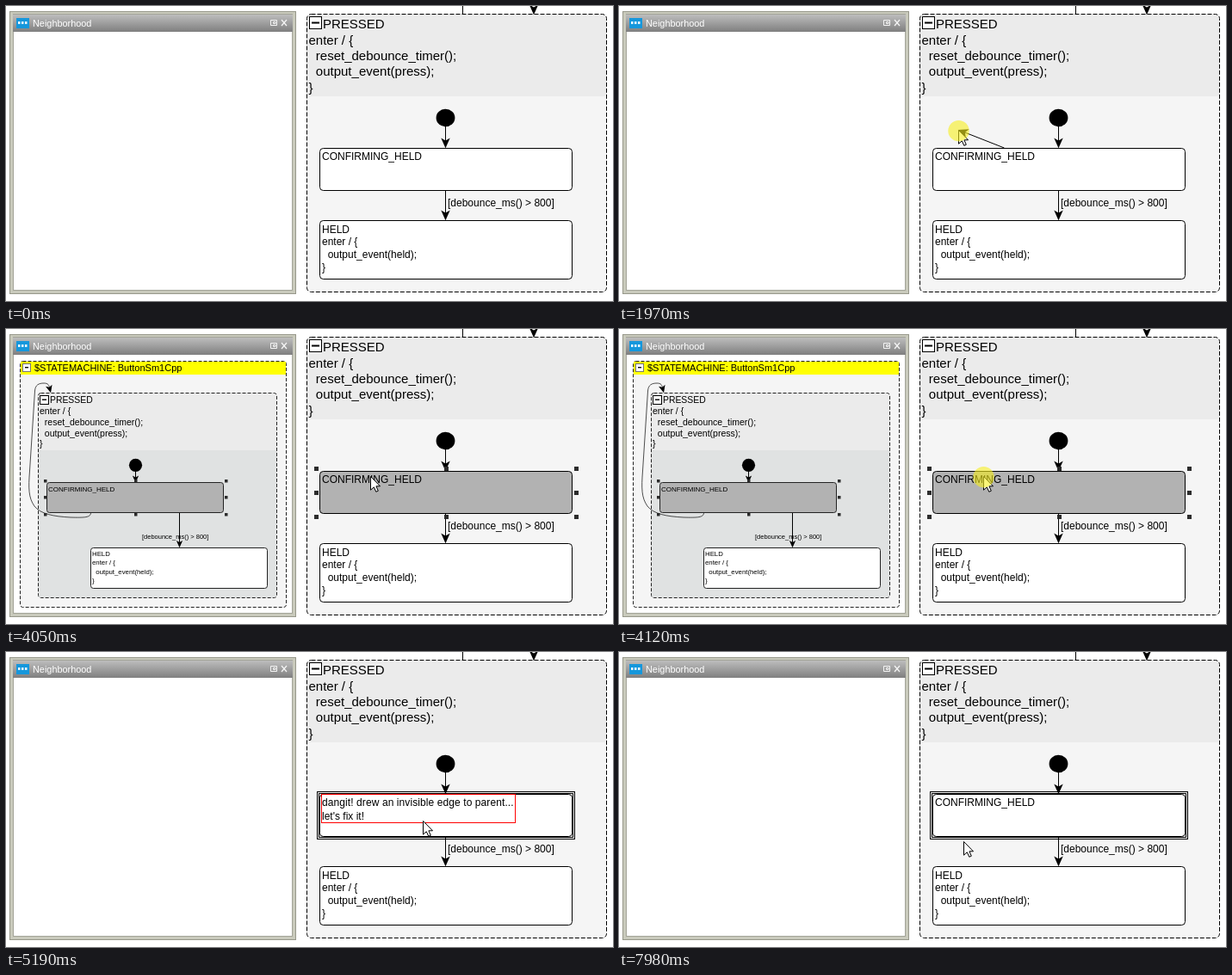
An HTML page for the animation above (8000 ms loop, 705 by 343 pixels).

```html
<!DOCTYPE html>
<html lang="en">
<head>
<meta charset="utf-8">
<title>State machine editor</title>
<style>
  html, body { margin: 0; width: 100%; height: 100%; overflow: hidden; background: #fff; }
  svg { display: block; width: 705px; height: 343px; }
  text { font-family: "Liberation Sans", Arial, sans-serif; white-space: pre; }
</style>
</head>
<body>
<svg id="stage" viewBox="0 0 705 343" xmlns="http://www.w3.org/2000/svg"></svg>
<script>
const LOOP = 8000;

// Shape helpers
const rect = (x, y, w, h, fill, more = '') =>
  `<rect x="${x}" y="${y}" width="${w}" height="${h}" fill="${fill}" ${more}/>`;
const box = (x, y, w, h, fill, rx = 0, color = '#000', more = '') =>
  rect(x + .5, y + .5, w - 1, h - 1, fill, `rx="${rx}" stroke="${color}" ${more}`);
const text = (x, y, size, str, fill = '#000', more = '') =>
  `<text x="${x}" y="${y}" font-size="${size}" fill="${fill}" ${more}>${str.replace(/>/g, '&gt;')}</text>`;
const lines = (x, ys, size, strs) => strs.map((s, i) => text(x, ys[i], size, s)).join('');
const path = (d, more = 'fill="none" stroke="#000"') => `<path d="${d}" ${more}/>`;
const head = (x, y, deg = 90, s = 1) =>
  `<path d="M.3 0L-11.5 -5.2L-8.5 0L-11.5 5.2z" transform="translate(${x} ${y}) rotate(${deg}) scale(${s})"/>`;
const toggle = (x, y, s, color) =>
  box(x, y, s, s, '#fff', 0, color) + rect(x + 3, y + (s - 1) / 2 - .5, s - 6, s > 12 ? 2 : 1.4, '#000');
const handles = (xs, ys, s) => xs.flatMap((x, i) => ys.map((y, j) =>
  i === 1 && j === 1 ? '' : rect(x, y, s, s, '#2c2c2c'))).join('');
const layer = (id, content) => `<g id="${id}" visibility="hidden">${content}</g>`;

const dash = 'stroke-dasharray="5 2"';
const heldCode = ['HELD', 'enter / {', '  output_event(held);', '}'];
const pressedCode = ['enter / {', '  reset_debounce_timer();', '  output_event(press);', '}'];
const guard = '[debounce_ms() > 800]';

const panel =
  '<linearGradient id="bar" x2="0" y2="1"><stop stop-color="#bdbdbd"/><stop offset="1" stop-color="#7f7f7f"/></linearGradient>' +
  box(4, 6, 333, 329, '#c9cabc', 0, '#97988a') +
  box(8, 9, 325, 322, '#fff', 0, '#a3a498') +
  rect(8, 10, 325, 20, 'url(#bar)') +
  rect(12, 14, 15, 12, '#1597dc') +
  [14, 18, 22].map(x => rect(x, 18, 2.5, 3, '#e4f5ff')).join('') +
  text(31, 24, 10.9, 'Neighborhood', '#fff') +
  path('M307.5 16.5H314.5V22.5H307.5zM310.5 18.5H313V20.5H310.5z', 'fill="none" stroke="#f4f4f4"') +
  path('M320 16L326 23M326 16L320 23', 'fill="none" stroke="#f4f4f4" stroke-width="1.3"');

const diagram =
  box(349, 9, 349, 324, '#f5f5f5', 5, 'none') +
  rect(350, 10, 347, 95, '#ebebeb', 'rx="4"') +
  box(349, 9, 349, 324, 'none', 5, '#000', dash) +
  path('M530.5 0V9') + head(613, 10) +
  toggle(352, 12, 15) +
  text(368, 26, 15, 'PRESSED') +
  lines(351.5, [45, 63, 81, 100], 15, pressedCode) +
  '<ellipse cx="510.5" cy="130" rx="10.9" ry="10.3"/>' +
  path('M510.5 140V158') + head(510.5, 165) +
  box(364, 165, 294, 50, '#fff', 4, '#000', 'id="node"') +
  path('M510.5 215V242') + head(510.5, 249) +
  text(513, 233, 12, guard) +
  box(364, 249, 294, 69, '#fff', 4) +
  lines(367, [264, 278, 293, 308], 12, heldCode);

const overview =
  box(16, 37, 310, 287, '#f5f5f5', 3, '#222', 'stroke-dasharray="4 2"') +
  rect(17, 38, 308, 15, '#ff0') +
  toggle(19, 40, 10, '#777') +
  text(33, 49, 11, '$STATEMACHINE: ButtonSm1Cpp') +
  box(37, 74, 278, 239, '#e0e2e2', 3, 'none') +
  rect(38, 75, 276, 66, '#ebebeb') +
  box(37, 74, 278, 239, 'none', 3, '#222', 'stroke-dasharray="4 2"') +
  toggle(39, 77, 11) +
  text(51, 86, 10.4, 'PRESSED') +
  lines(39, [99, 112, 125, 137], 10.5, pressedCode) +
  '<circle cx="150.5" cy="158.3" r="7.6"/>' +
  path('M150.5 165V174') + head(150.5, 178.5, 90, .7) +
  box(47, 178, 206, 36, '#b2b2b2', 3, '#222') +
  text(49, 189, 8, 'CONFIRMING_HELD') +
  handles([44, 149, 254], [175, 194, 214], 3.5) +
  path('M98.5 214C98 219 92 219.5 75 219C55 218 40 215 33 206C26 196 26 185 27.5 165L33.5 72C34 65 38 63 44 63C49 63 50 65 51 70',
    'fill="none" stroke="#222" stroke-width=".8"') +
  head(52, 74, 75, .75) +
  path('M201.5 214V250') + head(201.5, 254, 90, .7) +
  text(158, 244, 7.5, guard) +
  box(98, 254, 206, 48, '#fff', 3, '#222') +
  lines(100, [263.5, 273.5, 284.5, 294.5], 7.8, heldCode);

const frame = box(361, 162, 300, 56, 'none') + box(363, 164, 296, 52, 'none');
const nameEdit = box(366, 165, 119, 34, '#fff', 0, '#f00') +
  rect(367, 166, 117, 16, '#0078d7') +
  text(367, 179, 12, 'CONFIRMING_HELD', '#fff');
const noteEdit = box(366, 165, 226, 34, '#fff', 0, '#f00') +
  text(367, 179, 12, 'dangit! drew an invisible edge to parent...', '#000', 'letter-spacing=".09"') +
  text(367, 195, 12, "let's fix it!");

const stage = document.getElementById('stage');
stage.innerHTML = rect(0, 0, 705, 343, '#fff') + panel + diagram +
  layer('overview', overview) +
  layer('groupMarks', handles([343, 521, 697], [3, 168, 332], 5)) +
  layer('nodeMarks', handles([358, 509, 660], [160, 188, 216], 5)) +
  layer('frame', frame) +
  layer('name', text(367, 179, 12, 'CONFIRMING_HELD')) +
  layer('nameEdit', nameEdit) +
  layer('noteEdit', noteEdit) +
  layer('caret', rect(415, 182, 1, 16, '#000')) +
  layer('edge', path('', 'id="wire" fill="none" stroke="#000"') + '<g id="tip">' + head(0, 0, 0) + '</g>') +
  layer('cursor', path('M.5 .5V16.2L4.3 12.8L6.8 18.3L9.3 17.2L6.9 11.8H11.5z', 'fill="#fff" stroke="#000"')) +
  layer('press', '<circle r="12.2" cx=".5" cy="1.2" fill="#f6ee1e" opacity=".6"/>');

const el = {};
for (const node of stage.querySelectorAll('[id]')) el[node.id] = node;

// Layer visibility as [from, to) spans in ms
const spans = {
  cursor: [[520, LOOP]],
  press: [[1560, 2370], [3980, 4050], [4120, 4250]],
  groupMarks: [[2240, 3110]],
  nodeMarks: [[4050, 4320]],
  overview: [[4050, 4320]],
  frame: [[4320, LOOP]],
  name: [[0, 4320], [6910, LOOP]],
  nameEdit: [[4320, 4520]],
  noteEdit: [[4520, 6910]],
  caret: [[4520, 5050], [5520, 6050], [6510, 6910]]
};

const easeOut = p => 1 - (1 - p) ** 2;
const smooth = p => p * p * (3 - 2 * p);
const linear = p => p;

// Pointer moves: start, last step, step count, easing, [progress, x, y]...
const moves = [
  [520, 1290, 12, easeOut, [0, 690, 362], [1, 413, 170]],
  [1360, 1360, 1, linear, [0, 413, 170], [1, 413, 169]],
  [1560, 2310, 11, linear, [0, 413, 169], [.09, 413, 169], [.545, 394, 144], [1, 355, 132]],
  [3430, 3710, 5, smooth, [0, 355, 132], [1, 423, 171]],
  [4850, 5190, 6, smooth, [0, 423, 171], [1, 484, 196]],
  [7240, 7980, 10, smooth, [0, 484, 196], [.25, 464, 192], [1, 400, 220]]
];

function pointer(t) {
  const move = moves.filter(m => t >= m[0]).pop() || moves[0];
  const [start, last, n, ease, ...pts] = move;
  const step = n > 1 ? Math.floor((t - start) / (last - start) * (n - 1) + .01) : 0;
  const p = ease(Math.max(0, Math.min(1, (step + 1) / n)));
  let i = 1;
  while (i < pts.length - 1 && p > pts[i][0]) i++;
  const [a, b] = [pts[i - 1], pts[i]];
  const f = (p - a[0]) / (b[0] - a[0]);
  return [1, 2].map(k => Math.round(a[k] + (b[k] - a[k]) * f));
}

const show = (id, on) => el[id].setAttribute('visibility', on ? 'visible' : 'hidden');

function draw(t) {
  const active = id => spans[id].some(([a, b]) => t >= a && t < b);
  for (const id in spans) show(id, active(id));
  el.node.setAttribute('fill', active('nodeMarks') ? '#b2b2b2' : '#fff');

  const [x, y] = pointer(t);
  const place = `translate(${x} ${y})`;
  el.cursor.setAttribute('transform', place);
  el.press.setAttribute('transform', place);

  // The new edge runs from the node's centre, clipped at its top side
  const wired = t >= 1560 && t < 2370 && y < 163;
  show('edge', wired);
  if (wired) {
    const dx = x - 511, dy = y - 190;
    const deg = Math.atan2(dy, dx) * 180 / Math.PI;
    el.wire.setAttribute('d', `M${511 - 25 * dx / dy} 165L${x + 6} ${y + 6 * dy / dx}`);
    el.tip.setAttribute('transform', `${place} rotate(${deg})`);
  }
}

function tick() {
  draw(performance.now() % LOOP);
  requestAnimationFrame(tick);
}
tick();
</script>
</body>
</html>
```
